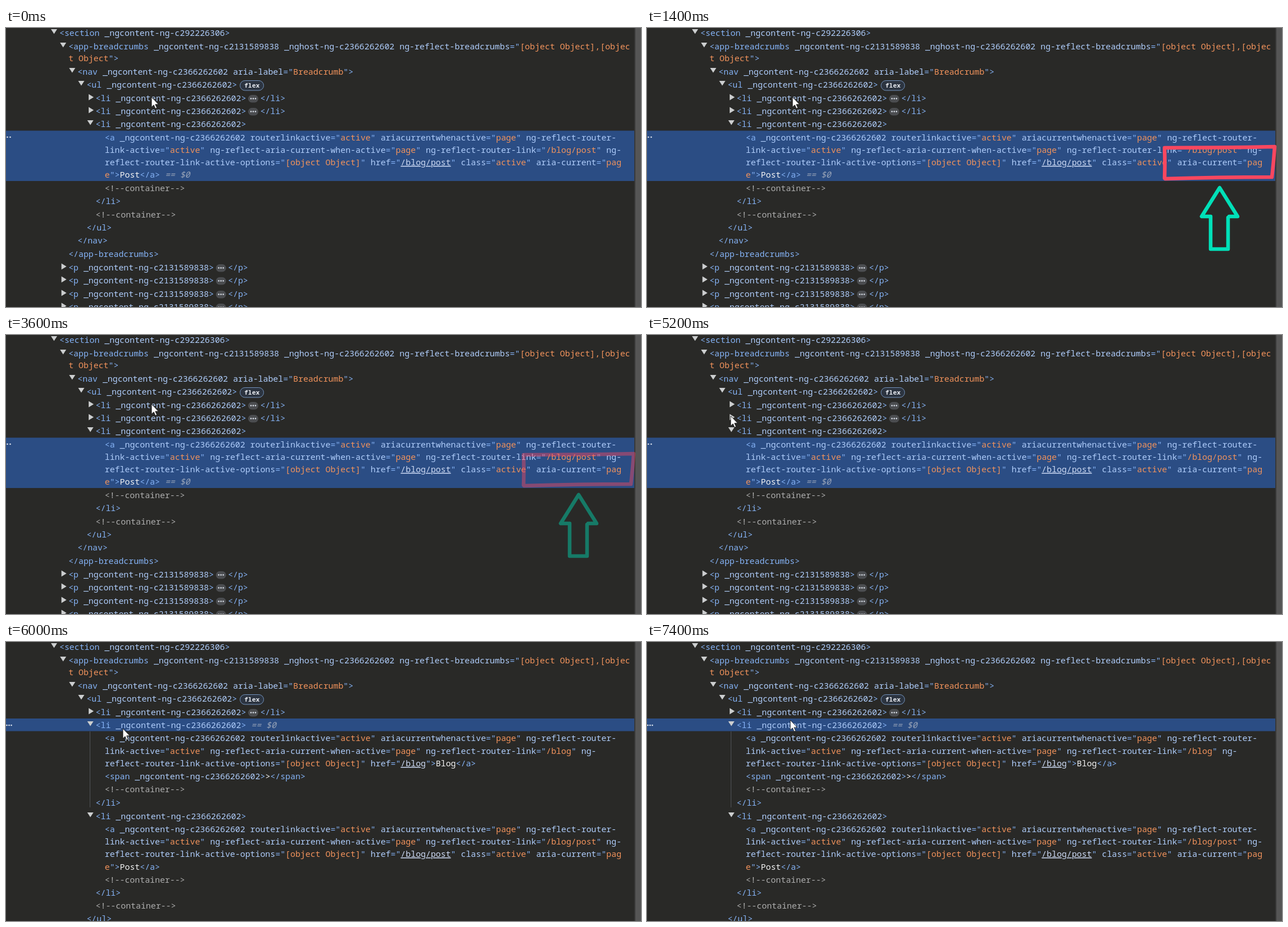
Recreate the animation shown at these times as an HTML page. Size 1130 by 496 pixels, loop 7600 ms.

```html
<!DOCTYPE html>
<html lang="en">
<head>
<meta charset="utf-8">
<title>Breadcrumb inspector</title>
<style>
html, body { margin: 0; width: 100%; height: 100%; overflow: hidden; background: #292927; }
svg { display: block; width: 1130px; height: 496px; }
text { font: 500 14.88px "Noto Sans Mono", "DejaVu Sans Mono", monospace; white-space: pre; }
.tag { fill: #85b3f6; }
.attr { fill: #afcdfb; }
.val { fill: #f2935c; }
.link { fill: #cfdcf6; text-decoration: underline; }
.str { fill: #f4f4f4; }
.note { fill: #adadad; }
.ref { fill: #98a4b8; font-style: italic; font-weight: 400; }
.twist { fill: #cccecf; }
.sel { fill: #2b4d84; }
.pill { fill: #2c3440; stroke: #7393bd; }
.pen { fill: none; stroke-width: 6.5; stroke-linecap: round; stroke-linejoin: round; }
</style>
</head>
<body>
<svg id="stage" viewBox="0 0 1130 496">
  <rect width="1130" height="496" fill="#292927"/>
  <g id="head"></g>
  <g id="closed"></g>
  <g id="opened"></g>
  <rect x="1118" width="2" height="496" fill="#383838"/>
  <rect x="1120" width="10" height="496" fill="#555"/>
  <g id="marks">
    <path id="box" class="pen" stroke="#f9475f" pathLength="1"
      d="M921 267 Q922 240 921 213 Q1020 213 1117 211 Q1115 240 1112 265 Q1015 265 922 268"/>
    <path id="arrow" class="pen" stroke="#00e0b8" pathLength="1"
      d="M1036 335 H1051 L1019 284 L987 335 H1003 V393 H1034 V337"/>
  </g>
  <path id="cursor" fill="#fff" stroke="#111" stroke-width=".8"
    d="M0 0 V17.5 L4 13.8 L6.8 20.2 L9.5 19 L6.7 12.8 H12.3 Z"/>
</svg>
<script>
const NS = 'http://www.w3.org/2000/svg';
const $ = id => document.getElementById(id);
const CHAR = 14.88 * 0.6;
const LOOP = 7600, STEP = 200;

function add(parent, name, attrs = {}, content = '') {
  const el = document.createElementNS(NS, name);
  for (const k in attrs) el.setAttribute(k, attrs[k]);
  el.textContent = content;
  return parent.appendChild(el);
}

// {value}  ~link~  'text'; the rest is coloured by its syntax
const TOKEN = /\{(.*?)\}|~(.*?)~|'(.*?)'|(<!--.*?-->)|(== \$0)|(<\/?[\w-]+|[>="]+)|([^<>="{~']+)/g;
const KINDS = ['val', 'link', 'str', 'note', 'ref', 'tag', 'attr'];

function write(g, x, y, code) {
  const line = add(g, 'text', { x, y: y + 5 });
  let count = 0;
  for (const m of code.matchAll(TOKEN)) {
    const i = m.slice(1).findIndex(s => s !== undefined);
    add(line, 'tspan', { class: KINDS[i] }, m[i + 1]);
    count += m[i + 1].length;
  }
  return x + count * CHAR;
}

const indent = depth => 95 + 16.15 * depth;

function row(g, depth, y, code) {
  return write(g, indent(depth), y, code);
}

function open(g, depth, y, code) {
  const x = indent(depth) - 9.5;
  add(g, 'path', { class: 'twist', d: `M${x - 5.5} ${y - 7} h11 l-5.5 8.5 z` });
  return row(g, depth, y, code);
}

function fold(g, depth, y, code, end) {
  const x = indent(depth) - 12.5;
  add(g, 'path', { class: 'twist', d: `M${x} ${y - 7.5} v11 l9 -5.5 z` });
  const e = row(g, depth, y, code);
  add(g, 'rect', { x: e + 3.5, y: y - 6, width: 18, height: 13.5, rx: 6.5, fill: '#4b4d50' });
  dots(g, e + 12.5, y + .5, [-4, 0, 4]);
  write(g, e + 25, y, end);
}

function dots(g, x, y, offs) {
  for (const d of offs) add(g, 'circle', { cx: x + d, cy: y, r: 1.3, fill: '#dfe5ee' });
}

function select(g, y, height) {
  add(g, 'rect', { class: 'sel', y, width: 1118, height });
}

const SCOPE = '_ngcontent-ng-c2366262602';
const HOST = '_ngcontent-ng-c2131589838';
const LI = `<li ${SCOPE}>`;
const NOTE = '<!--container-->';

function anchor(g, ys, link, tail) {
  const lines = [
    `<a ${SCOPE} routerlinkactive="{active}" ariacurrentwhenactive="{page}" ng-reflect-router-`,
    `link-active="{active}" ng-reflect-aria-current-when-active="{page}" ng-reflect-router-link="{${link}}" ng-`,
    `reflect-router-link-active-options="{[object Object]}" href="~${link}~"${tail[0]}`,
    ...tail.slice(1)
  ];
  lines.forEach((s, i) => row(g, 5, ys[i], s));
}

const postTail = end => [` class="{active}" aria-current="{pag}`, `{e}">'Post'</a>${end}`];

function drawHead(g) {
  open(g, 0, 9, '<section _ngcontent-ng-c292226306>');
  open(g, 1, 33, `<app-breadcrumbs ${HOST} _nghost-ng-c2366262602 ng-reflect-breadcrumbs="{[object Object],[objec}`);
  row(g, 1, 54, '{t Object}">');
  open(g, 2, 78, `<nav ${SCOPE} aria-label="{Breadcrumb}">`);
  open(g, 3, 101, `<ul ${SCOPE}>`);
  add(g, 'rect', { class: 'pill', x: 416.5, y: 93.5, width: 42, height: 17.5, rx: 8.7 });
  add(g, 'text', { x: 424, y: 106, fill: '#e6e9ee', style: 'font-size:11.4px;font-weight:600' }, 'flex');
  fold(g, 4, 125, LI, '</li>');
}

function drawClosed(g) {
  fold(g, 4, 148, LI, '</li>');
  open(g, 4, 171, LI);
  select(g, 182.5, 89.5);
  dots(g, 5, 194, [-2.5, 2.5]);
  anchor(g, [195, 217, 239, 261], '/blog/post', postTail(' == $0'));
  row(g, 5, 285, NOTE);
  row(g, 4, 308, '</li>');
  row(g, 4, 332, NOTE);
  row(g, 3, 355, '</ul>');
  row(g, 2, 378, '</nav>');
  row(g, 1, 402, '</app-breadcrumbs>');
  for (const y of [426, 449, 473, 496]) fold(g, 1, y, `<p ${HOST}>`, '</p>');
}

function drawOpened(g) {
  select(g, 136, 22.5);
  dots(g, 5.5, 148, [-4, 0, 4]);
  add(g, 'rect', { x: 149, y: 159, width: 1, height: 135, fill: '#505357' });
  open(g, 4, 148, LI + ' == $0');
  anchor(g, [171, 194, 216], '/blog', [`>'Blog'</a>`]);
  row(g, 5, 239, `<span ${SCOPE}>'>'</span>`);
  row(g, 5, 262, NOTE);
  row(g, 4, 286, '</li>');
  open(g, 4, 310, LI);
  anchor(g, [333, 355, 377, 400], '/blog/post', postTail(''));
  row(g, 5, 423, NOTE);
  row(g, 4, 446, '</li>');
  row(g, 4, 469, NOTE);
  row(g, 3, 492, '</ul>');
}

drawHead($('head'));
drawClosed($('closed'));
drawOpened($('opened'));

// time, x, y of the pointer tip
const MOVES = [
  [0, 259, 123], [4000, 259, 123], [5000, 149, 144], [5400, 149, 144],
  [6000, 208, 154], [6600, 255, 139], [LOOP, 255, 139]
];
const part = (t, a, b) => Math.min(1, Math.max(0, (t - a) / (b - a)));
const ease = p => p * p * (3 - 2 * p);

function pointer(t) {
  const i = MOVES.findIndex(m => m[0] > t);
  const [t0, x0, y0] = MOVES[i - 1], [t1, x1, y1] = MOVES[i];
  const p = ease(part(t, t0, t1));
  return [x0 + (x1 - x0) * p, y0 + (y1 - y0) * p];
}

function trace(id, p) {
  $(id).style.visibility = p > 0 ? 'visible' : 'hidden';
  $(id).setAttribute('stroke-dasharray', p < 1 ? `${p} 2` : 'none');
}

function show(t) {
  trace('box', part(t, 100, 550));
  trace('arrow', part(t, 550, 940));
  $('marks').setAttribute('opacity', 1 - part(t, 3400, 3760));
  $('closed').style.display = t < 5400 ? '' : 'none';
  $('opened').style.display = t < 5400 ? 'none' : '';
  $('cursor').setAttribute('transform', `translate(${pointer(t)})`);
}

const start = performance.now();
function tick() {
  const t = (performance.now() - start) % LOOP;
  show(Math.floor(t / STEP) * STEP);
  requestAnimationFrame(tick);
}
tick();
</script>
</body>
</html>
```
